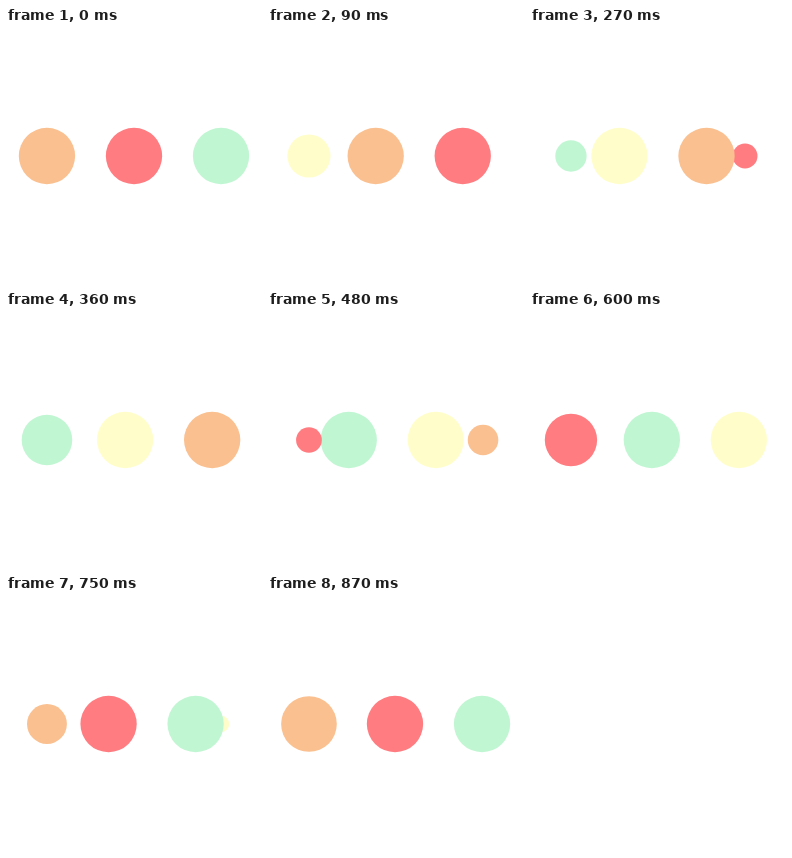
Recreate the animation shown at these times as an HTML page. Size 256 by 256 pixels, loop 900 ms.

```html
<!DOCTYPE html>
<html lang="en">
<head>
<meta charset="utf-8">
<title>Loading dots</title>
<style>
  html, body { margin: 0; width: 100%; height: 100%; overflow: hidden; background: #fff; }
  svg { display: block; width: 100%; height: 100%; }
</style>
</head>
<body>
<svg viewBox="0 0 100 100"></svg>
<script>
const LOOP = 900, TICK = 30, PHASES = 4;
const R = 11, LEFT = 16, GAP = 34;
const COLORS = ['#c1f6d3', '#fffecb', '#fac090', '#ff7c81'];

const svg = document.querySelector('svg');

function addDot(fill) {
  const dot = document.createElementNS('http://www.w3.org/2000/svg', 'circle');
  dot.setAttribute('cy', 50);
  dot.setAttribute('fill', fill);
  svg.append(dot);
  return dot;
}

function place(dot, cx, r) {
  dot.setAttribute('cx', cx);
  dot.setAttribute('r', r);
}

// cubic-bezier(0, 0.5, 0.5, 1), solved by bisection
function ease(x) {
  let lo = 0, hi = 1;
  for (let i = 0; i < 30; i++) {
    const s = (lo + hi) / 2;
    if (1.5 * s * s - 0.5 * s ** 3 < x) lo = s; else hi = s;
  }
  const s = (lo + hi) / 2, q = 1 - s;
  return 1.5 * s * q * q + 3 * s * s * q + s ** 3;
}

// The leaving dot lies beneath the four that travel
const leaving = addDot(COLORS[0]);
const dots = COLORS.map(addDot);

function draw(ms) {
  const t = Math.floor((ms + 0.5) / TICK) * TICK % LOOP;
  const beat = t / LOOP * PHASES;
  const step = Math.floor(beat);
  const u = beat - step;
  const e = u ? ease(u) : 0;

  place(leaving, LEFT + 2 * GAP, R * (1 - e));
  leaving.setAttribute('fill', COLORS[(PHASES - step) % PHASES]);

  // Phases: hidden, growing, left to middle, middle to right
  dots.forEach((dot, i) => {
    const phase = (step + i) % PHASES;
    const r = phase === 0 ? 0 : phase === 1 ? R * e : R;
    const cx = phase < 2 ? LEFT : LEFT + GAP * (phase - 2 + e);
    place(dot, cx, r);
  });
}

const start = performance.now();
function frame() {
  draw(performance.now() - start);
  requestAnimationFrame(frame);
}
frame();
</script>
</body>
</html>
```
